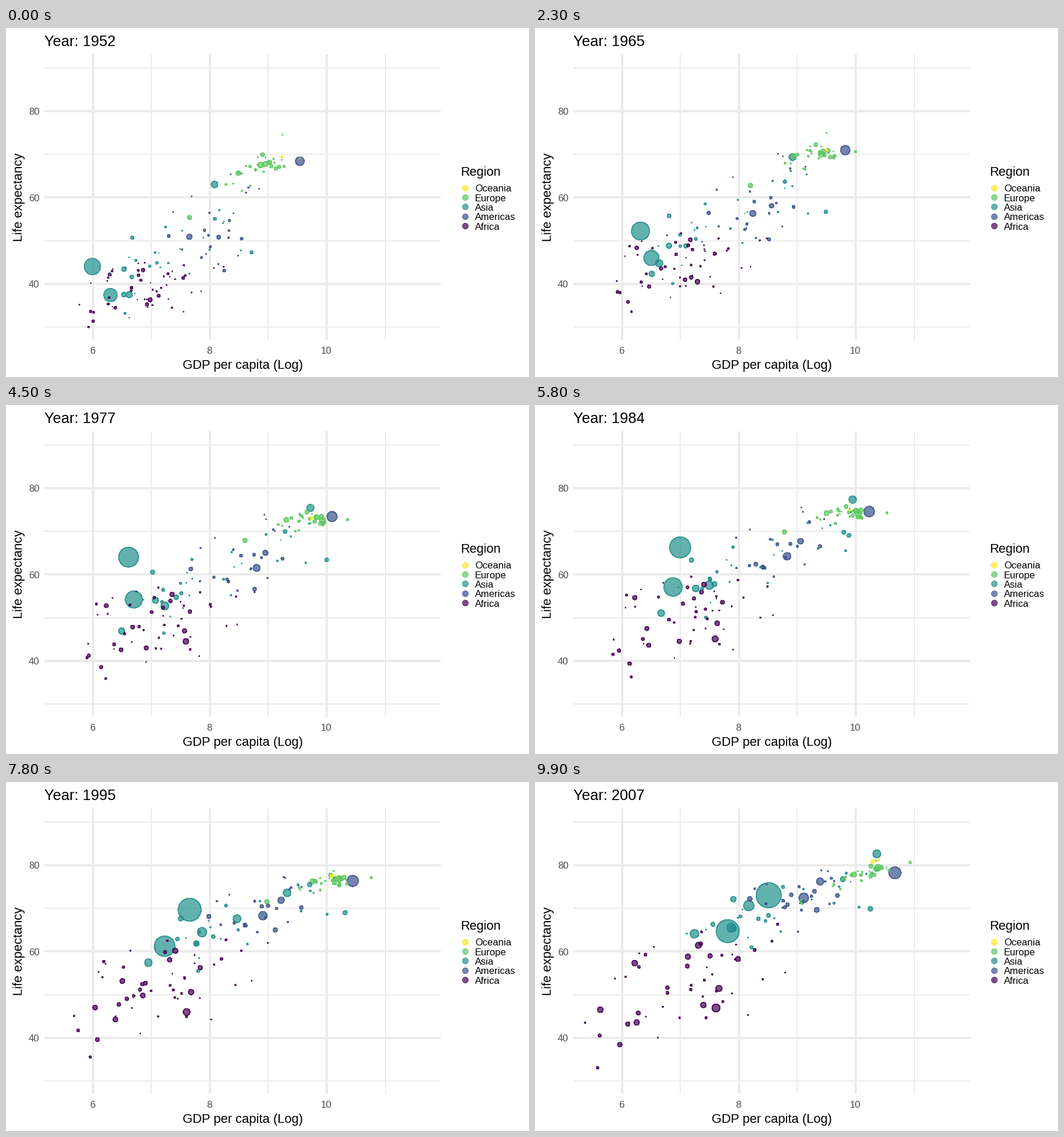
A matplotlib script for the animation above (10 s loop, 900 by 600 pixels).

```python
import numpy as np
import matplotlib.pyplot as plt
from matplotlib.animation import FuncAnimation

plt.rcParams["font.family"] = ["Liberation Sans", "DejaVu Sans"]

W, H, DPI = 900, 600, 100
PT = 72 / DPI
FRAMES, STEP = 100, 9          # a new survey every nine frames
T = np.arange(12)
COLORS = {"Oceania": "#FDE725", "Europe": "#5DC863", "Asia": "#21908C",
          "Americas": "#3B528B", "Africa": "#440154"}
dots = {name: [] for name in COLORS}
rng = np.random.default_rng(11)


def growth(p0, p1):
    return p0 * (p1 / p0) ** (T / T[-1])


def lead(region, p0, p1, *keys):
    """A large bubble: population in millions, keys of (survey, log GDP, life)."""
    t, gdp, life = zip(*keys)
    dots[region].append((growth(p0, p1), np.interp(T, t, gdp), np.interp(T, t, life)))


def crowd(region, n, top, low, rate, *eras):
    """Seeded dots; each era is (mean x, x spread, mean y, slope, y noise)."""
    for pop in np.geomspace(top, low, n):
        z, w = np.clip(rng.normal(size=2), -1.9, 1.9)
        xy = []
        for mx, sx, my, slope, noise in eras:
            zt = z + rng.normal(0, 0.2)
            xy.append((mx + sx * zt, my + slope * zt + noise * w))
        gdp, life = (np.polyval(np.polyfit((0, 5, 11), v, 2), T) for v in zip(*xy))
        end = pop * rate * rng.uniform(0.8, 1.2)
        dots[region].append((growth(pop, end), gdp, np.clip(life, 30, 82)))


lead("Asia", 556, 1319, (0, 5.99, 44), (1, 6.36, 50.5), (2, 6.19, 44.5), (3, 6.42, 58.4),
     (5, 6.61, 64), (8, 7.41, 68.7), (11, 8.51, 73))
lead("Asia", 372, 1110, (0, 6.30, 37.4), (5, 6.70, 54.2), (8, 7.06, 60.2), (11, 7.81, 64.7))
lead("Asia", 82, 223, (0, 6.62, 37.5), (3, 6.64, 46), (5, 7.23, 52.7), (8, 7.78, 62.7), (11, 8.17, 70.6))
lead("Asia", 90, 130, (0, 8.08, 63), (5, 9.72, 75.4), (8, 10.19, 79.4), (11, 10.36, 82.6))
lead("Asia", 41.3, 169, (0, 6.53, 43.4), (5, 7.07, 54), (11, 7.87, 65.5))
lead("Asia", 46, 150.4, (0, 6.53, 37.5), (5, 6.49, 46.9), (11, 7.24, 64.1))
lead("Americas", 158, 301, (0, 9.54, 68.4), (5, 10.09, 73.4), (11, 10.67, 78.2))
lead("Americas", 56.6, 190, (0, 7.65, 50.9), (5, 8.80, 61.5), (8, 8.85, 67.1), (11, 9.11, 72.4))
lead("Americas", 30, 109, (0, 8.15, 50.8), (5, 8.95, 65), (11, 9.39, 76.2))
lead("Europe", 69, 82, (0, 8.87, 67.5), (5, 9.93, 72.5), (11, 10.38, 79.4))
lead("Africa", 33, 135, (0, 6.98, 36.3), (5, 7.59, 44.5), (11, 7.61, 46.9))
lead("Africa", 14, 65, (0, 6.66, 39.1), (5, 6.68, 47.8), (11, 5.63, 46.5))

crowd("Oceania", 2, 8.7, 2, 2.2,
      (9.23, .02, 69.2, .2, .1), (9.75, .06, 73, .6, .1), (10.29, .12, 80.7, .5, .1))
crowd("Europe", 29, 50, 1, 1.2,
      (8.65, .5, 65.5, 4.2, 2.2), (9.5, .42, 72.3, 1.5, 1.5), (10.0, .42, 77.3, 2.3, 1))
crowd("Asia", 27, 27, .3, 2.7,
      (7.3, .75, 47, 5, 6), (8.1, 1.0, 60, 6.2, 5.5), (8.75, 1.0, 70, 4.5, 4.5))
crowd("Americas", 22, 18, .7, 2.6,
      (8.1, .45, 53, 4.5, 6), (8.55, .45, 63.5, 3.5, 4.5), (9.0, .48, 73, 2, 2.5))
crowd("Africa", 50, 23, .3, 3.5,
      (6.95, .6, 39.2, 1.5, 4), (7.15, .7, 49, 2, 5.5), (7.3, .9, 54, 4, 7))


def px(v):
    return 149.6 + (np.asarray(v) - 6) * 100.6


def py(v):
    return 142.8 + (80 - np.asarray(v)) * 7.425


def ranked(rows):
    """A dot is a population rank: when two places swap rank, the dots cross."""
    pop, gdp, life = np.array(rows).transpose(1, 0, 2)
    order = np.argsort(-pop, axis=0)
    data = np.array([px(gdp), py(life), 0.4 + 0.595 * np.sqrt(pop)])
    return np.take_along_axis(data, order[None], axis=1)


paths = np.concatenate([ranked(rows) for rows in dots.values()], axis=1)
tints = np.concatenate([[COLORS[k]] * len(rows) for k, rows in dots.items()])


def area(r):
    return (2 * (np.asarray(r) - 0.5) * PT) ** 2


def state(i):
    """Positions, radii and colours, largest bubble first."""
    k = min(i // STEP, len(T) - 2)
    f = i / STEP - k
    now = paths[:, :, k] * (1 - f) + paths[:, :, k + 1] * f
    order = np.argsort(-now[2], kind="stable")
    x, y, r = now[:, order]
    return x, y, r, list(tints[order])


fig = plt.figure(figsize=(W / DPI, H / DPI), dpi=DPI, facecolor="white")
ax = fig.add_axes([0, 0, 1, 1])
ax.set(xlim=(0, W), ylim=(H, 0))
ax.axis("off")


def label(x, y, s, size, **kw):
    return ax.text(x, y, s, fontsize=size * PT, va="baseline", **kw)


def grid(xs, ys, width):
    style = dict(colors="#EBEBEB", linewidths=width * PT, antialiased=False,
                 snap=False, zorder=1)
    ax.vlines(px(xs), 45, 536, **style)
    ax.hlines(py(ys), 66, 748, **style)


def circles(x, y, r, colors):
    return ax.scatter(x, y, s=area(r), c=colors, alpha=0.7, edgecolors="face",
                      linewidths=PT, antialiased=False, zorder=3)


grid((7, 9, 11), (30, 50, 70, 90), 1)
grid((6, 8, 10), (40, 60, 80), 3)
for v in (6, 8, 10):
    label(px(v) - 0.8, 560, str(v), 16.8, ha="center", color="#4D4D4D")
for v in (40, 60, 80):
    label(57.5, py(v) + 6.2, str(v), 16.8, ha="right", color="#4D4D4D")
label(407, 586, "GDP per capita (Log)", 22, ha="center")
label(28, 291, "Life expectancy", 22, ha="center", rotation=90, rotation_mode="anchor")
label(782, 254, "Region", 22)
for i, (name, color) in enumerate(COLORS.items()):
    y = 274.5 + 16.4 * i
    circles([789.5], [y], [5.6], [color])
    label(807, y + 6.7, name, 16.8)

title = label(65.5, 31, "", 25.5)
cloud = circles(*state(0))


def draw(i):
    x, y, r, colors = state(i)
    cloud.set_offsets(np.column_stack([x, y]))
    cloud.set_sizes(area(r))
    cloud.set_facecolor(colors)
    title.set_text(f"Year: {round(1952 + 55 * i / (FRAMES - 1))}")
    return cloud, title


anim = FuncAnimation(fig, draw, frames=FRAMES, interval=100, repeat=True, repeat_delay=0)
plt.show()
```
